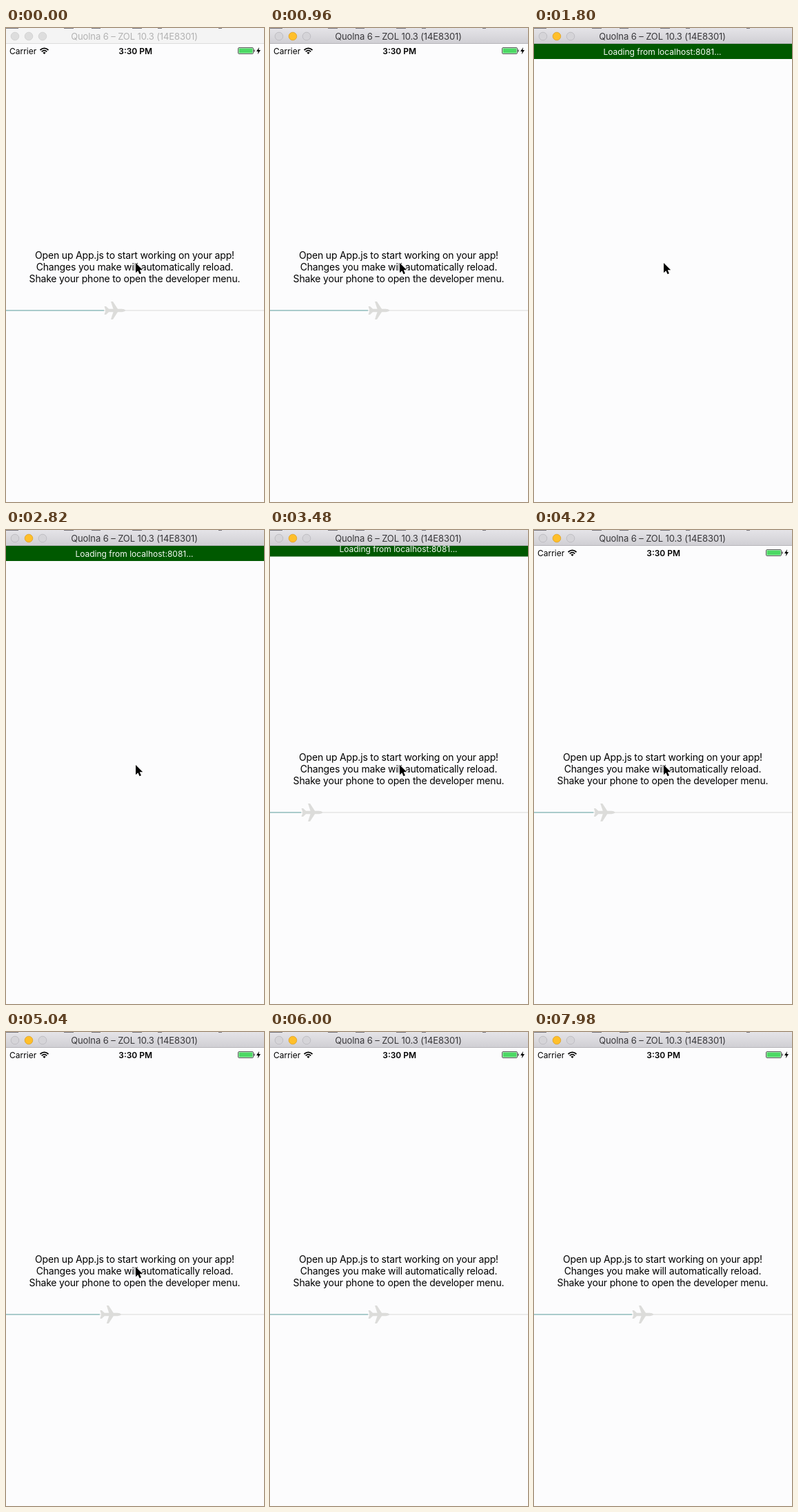
An HTML page that plays this animation: 374x688 px, repeating every 8000 ms.

```html
<!DOCTYPE html>
<html lang="en">
<head>
<meta charset="utf-8">
<title>Flight progress</title>
<style>
  html, body { margin: 0; width: 100%; height: 100%; overflow: hidden; background: #fcfcfd; }
  svg { display: block; width: 374px; height: 688px; font: 12px Inter, "Open Sans", sans-serif; }
  .middle { text-anchor: middle; }
  .message { font-size: 14px; letter-spacing: -0.18px; }
  #heading { font-size: 13px; letter-spacing: -0.1px; }
</style>
</head>
<body>
<svg viewBox="0 0 374 688">
  <defs>
    <linearGradient id="active" x2="0" y2="1">
      <stop stop-color="#e5e4e8"/>
      <stop offset="1" stop-color="#cfced3"/>
    </linearGradient>
  </defs>
  <rect width="374" height="688" fill="#fcfcfd"/>

  <g id="status">
    <text x="5" y="38">Carrier</text>
    <g fill="none" stroke="#000" stroke-width="1.7">
      <path d="M49.5 32 Q55.5 26.6 61.5 32"/>
      <path d="M51.7 34.3 Q55.5 31 59.3 34.3"/>
    </g>
    <path d="M53.3 35.8 Q55.5 34.2 57.7 35.8 L55.5 38Z"/>
    <text class="middle" x="187.7" y="38" font-weight="600">3:30 PM</text>
    <rect x="336.5" y="28.5" width="22" height="9" rx="1.5" fill="none" stroke="#565a58"/>
    <rect x="337.5" y="29.5" width="20" height="7" fill="#4cd964"/>
    <rect x="359.3" y="31.3" width="1.5" height="3.5" rx=".7" fill="#565a58"/>
    <path d="M367 28 L363 34 H365.6 L364.8 38.3 L369 32 H366.3Z"/>
  </g>

  <g id="content">
    <g class="middle message">
      <text x="186.5" y="334.5">Open up App.js to start working on your app!</text>
      <text x="186.5" y="351.5">Changes you make will automatically reload.</text>
      <text x="186.5" y="368.5">Shake your phone to open the developer menu.</text>
    </g>
    <rect y="409" width="374" height="2" fill="#ebebeb"/>
    <rect id="trail" y="409" height="2" fill="#a9cbcb"/>
    <path id="plane" fill="#dcdcda" d="M31 0C31-1.3 28-2.2 25-2.2H20L13-13H10L13.5-2.2H7L3-6H.5L2.5 0 .5 6H3L7 2.2H13.5L10 13H13L20 2.2H25C28 2.2 31 1.3 31 0Z"/>
  </g>

  <g id="loading">
    <rect y="23" width="374" height="22" fill="#005900"/>
    <text class="middle" x="186" y="38.5" fill="#f4f8f4">Loading from localhost:8081...</text>
  </g>

  <rect id="bar" width="374" height="23"/>
  <path id="edge" d="M0 22.5H374"/>
  <path d="M0 .5H18M84 .5H98M124 .5H137M183 .5H197M220 .5H226M308 .5H313" stroke="#77757c"/>
  <g id="buttons" stroke-width=".8">
    <circle cx="13" cy="12" r="5.8"/>
    <circle id="minimise" cx="33" cy="12" r="5.8"/>
    <circle cx="53" cy="12" r="5.8"/>
  </g>
  <text id="heading" class="middle" x="186" y="17">Quolna 6 – ZOL 10.3 (14E8301)</text>

  <path id="cursor" d="M0 0V14.2L3.3 11.2 5.6 16.2 7.9 15.2 5.7 10.3H10.2Z" stroke="#fff" stroke-width="1.8" paint-order="stroke"/>
</svg>

<script>
const LOOP = 8000;
const FOCUS = 400, RELOAD = 1700, MOUNT = 3100, HIDE = 3385, LEAVE = 5250;
const $ = id => document.getElementById(id);
const set = (id, attrs) => Object.entries(attrs).forEach(([k, v]) => $(id).setAttribute(k, v));
const show = (id, visible) => set(id, { visibility: visible ? "visible" : "hidden" });
const progress = (t, start, duration) => Math.min(1, Math.max(0, (t - start) / duration));
const easeInOut = u => u < 0.5 ? 2 * u * u : 1 - 2 * (1 - u) ** 2;

function drawWindow(focused) {
  set("bar", { fill: focused ? "url(#active)" : "#f4f4f4" });
  set("edge", { stroke: focused ? "#b6b5ba" : "#dcdcdc" });
  set("buttons", {
    fill: focused ? "#d5d4d8" : "#dddddd",
    stroke: focused ? "#b9b8bd" : "#cecece"
  });
  set("minimise", focused
    ? { fill: "#ffbf2a", stroke: "#dfa023" }
    : { fill: "#dddddd", stroke: "#cecece" });
  set("heading", { fill: focused ? "#38373a" : "#b2b2b2" });
}

function draw(t) {
  drawWindow(t >= FOCUS);

  const hidden = progress(t, HIDE, 250);
  show("content", t < RELOAD || t >= MOUNT);
  show("loading", t >= RELOAD && hidden < 1);
  set("loading", { transform: `translate(0 ${-22 * easeInOut(hidden)})` });

  const tail = t < RELOAD ? 142 : 39.7 + 102.3 * easeInOut(progress(t, MOUNT, 2350));
  set("trail", { width: tail });
  set("plane", { transform: `translate(${tail} 410)` });

  const exit = progress(t, LEAVE, 250);
  show("cursor", exit < 1);
  set("cursor", { transform: `translate(${188 + 186 * exit * exit} ${341 - 20 * exit})` });
}

function tick() {
  draw(performance.now() % LOOP);
  requestAnimationFrame(tick);
}
tick();
</script>
</body>
</html>
```
